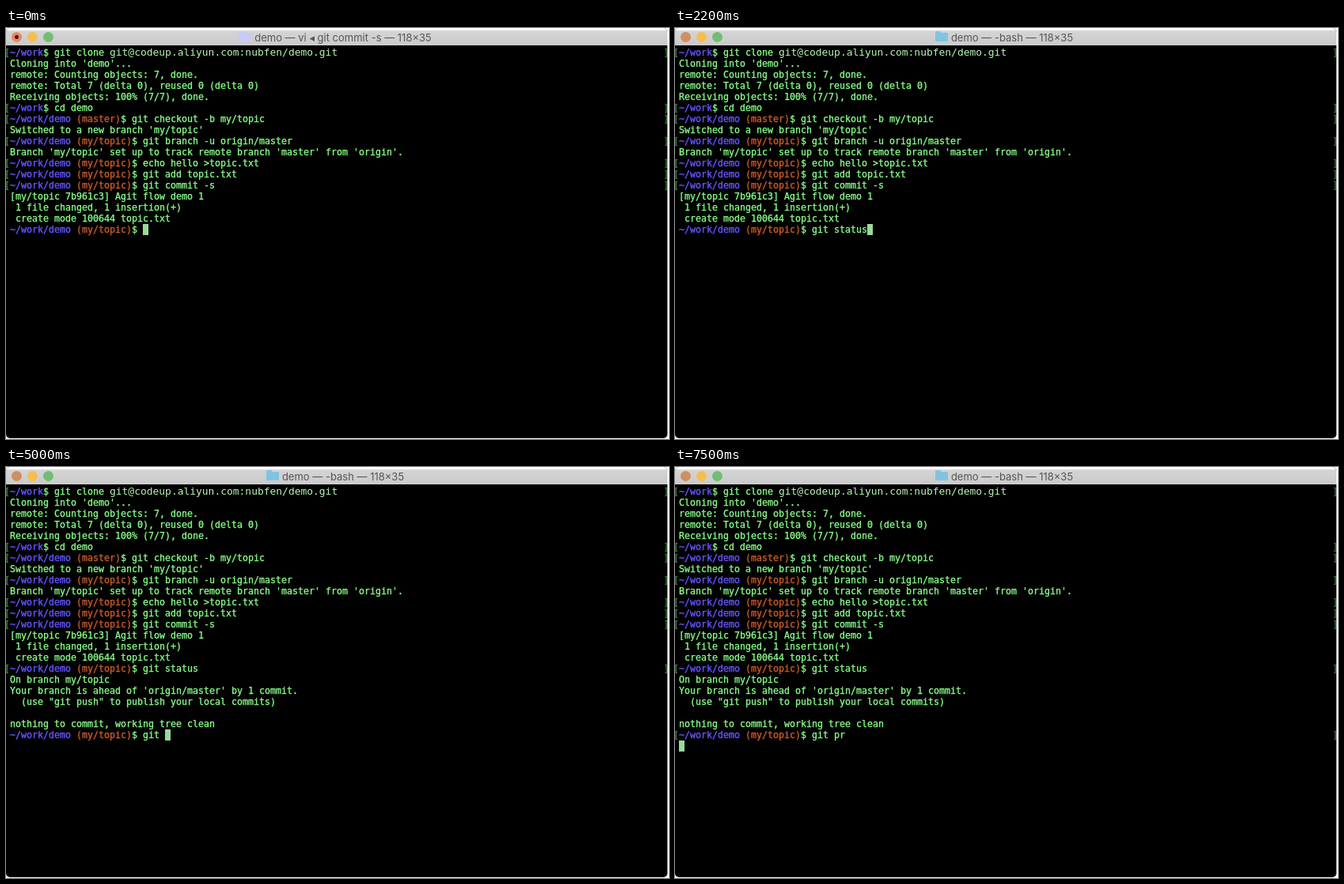
An HTML page for the animation above (8 s loop, 838 by 520 pixels).

```html
<!DOCTYPE html>
<html lang="en">
<head>
<meta charset="utf-8">
<title>Terminal</title>
<style>
html, body { margin: 0; width: 100%; height: 100%; overflow: hidden; background: #fff; }
#window { position: absolute; width: 836px; height: 519px; overflow: hidden; background: #000;
  border-radius: 5px; }
#bar { position: absolute; inset: 0 0 auto; height: 22px;
  background: linear-gradient(#fff 2px, #d4d4d4 4px, #cbcbcb); }
#bar i { position: absolute; top: 5px; width: 13px; height: 13px; border-radius: 50%; }
#close { left: 7px; background: #cf8f62; }
#minimize { left: 27px; background: #f6be4f; }
#zoom { left: 47px; background: #72bd76; }
.edited #close { background: radial-gradient(circle, #4a1408 2px, #e58a62 3px); }
#title { position: absolute; left: 0; top: 1px; width: 832px; height: 22px; display: flex;
  justify-content: center; align-items: center; gap: 4px; white-space: pre;
  font: 13px Inter, sans-serif; color: #565656; }
#folder { position: relative; top: -1px; width: 16px; height: 11px; border-radius: 1px; background: #80c4e2; }
#folder::before { content: ""; position: absolute; top: -2px; width: 7px; height: 3px;
  border-radius: 1px; background: inherit; }
.edited #folder { background: #c9c9fa; }
#screen { position: absolute; left: 5px; top: 24px; margin: 0; color: #8af58a;
  font: 11.63px/14px "DejaVu Sans Mono", monospace; -webkit-text-stroke: .25px;
  text-shadow: 0 0 1px #1f7a1f; }
#screen div { position: relative; height: 14px; }
.sent::before, .sent::after { position: absolute; top: 0; color: #4f864f; -webkit-text-stroke: 0; }
.sent::before { content: "["; left: -7px; }
.sent::after { content: "]"; left: 826px; }
.path { color: #6254ee; text-shadow: 0 0 1px #3a30c0; }
.branch { color: #b8642c; text-shadow: 0 0 2px #800; }
.address { font-size: 12.95px; color: #b9f5b4; -webkit-text-stroke: 0; text-shadow: none; }
.cursor { display: inline-block; width: 7px; height: 14px; vertical-align: top; background: #9bd99b; }
</style>
</head>
<body>
<div id="window">
  <div id="bar">
    <i id="close"></i><i id="minimize"></i><i id="zoom"></i>
    <div id="title"><span id="folder"></span><span id="caption"></span></div>
  </div>
  <pre id="screen"></pre>
</div>
<script>
const LOOP = 8000;
const CURSOR = '<span class="cursor"></span>';
const $ = id => document.getElementById(id);

const line = (html, cls = "") => `<div class="${cls}">${html}</div>`;
const output = text => text.split("\n").map(row => line(row)).join("");

function prompt(branch, command, sent = true) {
  const path = branch ? "~/work/demo" : "~/work";
  const suffix = branch ? ` <span class="branch">(${branch})</span>` : "";
  return line(`<span class="path">${path}</span>${suffix}$ ${command}${sent ? "" : CURSOR}`, sent ? "sent" : "");
}
const topic = (command, sent) => prompt("my/topic", command, sent);

const history = prompt("", 'git clone <span class="address">git@codeup.aliyun.com:nubfen/demo.git</span>') +
  output(`Cloning into 'demo'...
remote: Counting objects: 7, done.
remote: Total 7 (delta 0), reused 0 (delta 0)
Receiving objects: 100% (7/7), done.`) +
  prompt("", "cd demo") +
  prompt("master", "git checkout -b my/topic") +
  output("Switched to a new branch 'my/topic'") +
  topic("git branch -u origin/master") +
  output("Branch 'my/topic' set up to track remote branch 'master' from 'origin'.") +
  topic("echo hello >topic.txt") +
  topic("git add topic.txt") +
  topic("git commit -s") +
  output(`[my/topic 7b961c3] Agit flow demo 1
 1 file changed, 1 insertion(+)
 create mode 100644 topic.txt`);

const status = history + topic("git status") +
  output(`On branch my/topic
Your branch is ahead of 'origin/master' by 1 commit.
  (use "git push" to publish your local commits)

nothing to commit, working tree clean`);

// Each step: start time in ms, screen content
const steps = [
  [0, history + topic("", false)],
  [500, history + topic("git ", false)],
  [1000, history + topic("git status", false)],
  [3000, status + topic("", false)],
  [5000, status + topic("git ", false)],
  [5500, status + topic("git pr", false)],
  [7500, status + topic("git pr") + line(CURSOR)],
];

let shown;
function draw(now) {
  const time = now % LOOP;
  const step = steps.findLast(([start]) => time >= start);
  if (step !== shown) {
    shown = step;
    const editing = step === steps[0];
    $("window").className = editing ? "edited" : "";
    $("caption").textContent = `demo — ${editing ? "vi ◂ git commit -s" : "-bash"} — 118×35`;
    $("screen").innerHTML = step[1];
  }
  requestAnimationFrame(draw);
}
draw(0);
</script>
</body>
</html>
```
